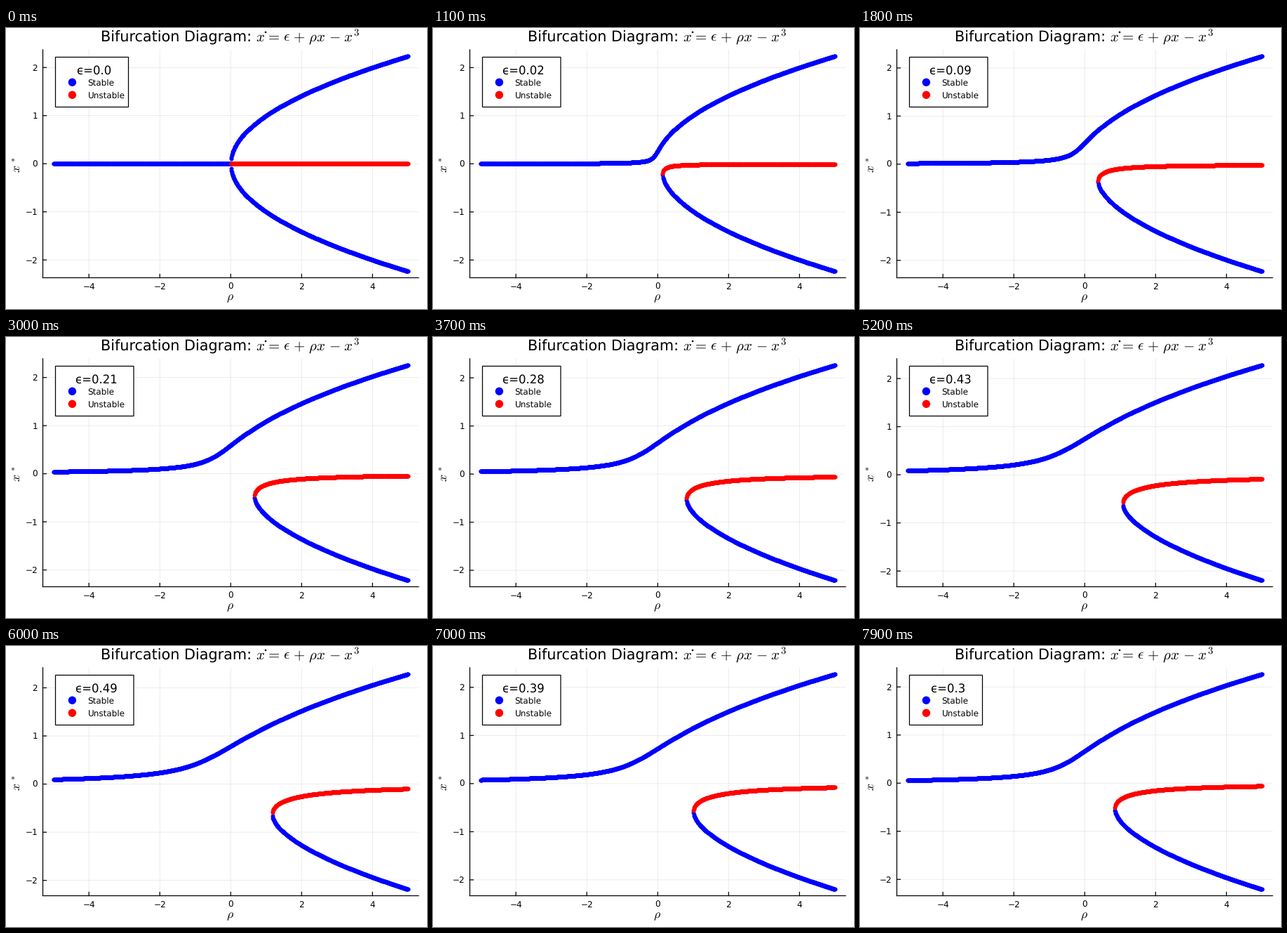
Recreate the animation shown at these times as a matplotlib script. Size 600 by 400 pixels, loop 8000 ms.

```python
import numpy as np
import matplotlib.pyplot as plt
from matplotlib.animation import FuncAnimation
from matplotlib.patches import Circle, Rectangle

W, H, DPI = 600, 400, 100
PT = 72 / DPI
LEFT, RIGHT, TOP, BOTTOM = 52.5, 588, 30.9, 355.5
BLUE, RED = "#0000ff", "#ff0000"

plt.rcParams.update({
    "font.family": "DejaVu Sans",
    "mathtext.fontset": "cm",
    "text.hinting": "none",
    "path.simplify": False,
    "path.snap": False,
})

fig = plt.figure(figsize=(W / DPI, H / DPI), dpi=DPI, facecolor="white")
ax = fig.add_axes([0, 0, 1, 1])
ax.set_xlim(0, W)
ax.set_ylim(H, 0)
ax.axis("off")

rho = np.linspace(-5, 5, 1001)


def px(x):
    return LEFT + (x + 5.3) / 10.6 * (RIGHT - LEFT)


def line(xs, ys, width=1.25, z=3, **kw):
    return ax.plot(xs, ys, color="black", lw=width * PT, zorder=z, **kw)[0]


def grid(xs, ys):
    return line(xs, ys, width=0.7, z=1, alpha=0.1)


def label(x, y, s, size, ha="left", **kw):
    return ax.text(x, y, s, fontsize=size * PT, ha=ha, va="baseline",
                   zorder=8, **kw)


def dots(color, z):
    return ax.plot([], [], "o", color=color, ms=6 * PT, mew=0, zorder=z)[0]


def spaced(formula):
    """Widen the gaps around the operators of a formula."""
    gap = r"\hspace{0.116}"
    for op in "=+-":
        formula = formula.replace(f" {op} ", f"{gap} {op} {gap}")
    return f"${formula}$"


def equilibria(eps):
    """Real roots of eps + rho x - x^3: top branch, then the lower pair."""
    top = np.full_like(rho, 3.0)
    for _ in range(60):
        slope = np.maximum(3 * top**2 - rho, 1e-12)
        top = top - (top**3 - rho * top - eps) / slope
    disc = 4 * rho - 3 * top**2
    ok = (disc >= 0) & (rho > 0)
    root = np.sqrt(disc[ok])
    return top, rho[ok], (root - top[ok]) / 2, (-root - top[ok]) / 2


def epsilon(i):
    """Hold at zero, rise to 0.5, then fall again, in hundredths."""
    return max(0, min(i - 9, 109 - i)) / 100


# Axes
line([LEFT, LEFT], [TOP, BOTTOM])
line([LEFT, RIGHT], [BOTTOM, BOTTOM])
for v in (-4, -2, 0, 2, 4):
    x = px(v)
    grid([x, x], [TOP, BOTTOM])
    line([x, x], [BOTTOM, BOTTOM - 5])
    label(x, 371.5, str(v).replace("-", "\u2212"), 12, "center")

levels = (-2, -1, 0, 1, 2)
y_grid = [grid([], []) for _ in levels]
y_ticks = [line([], []) for _ in levels]
y_names = [label(45, 0, str(v).replace("-", "\u2212"), 12, "right")
           for v in levels]

# Titles
label(135.3, 20, "Bifurcation Diagram:", 20.8)
label(356, 20, spaced(r"x = \epsilon + \rho x - x^3"), 20.8)
ax.add_patch(Circle((370, 6), 1.3, color="black", lw=0, zorder=8))
label(319.7, 387, r"$\rho$", 17.6, "center")
ax.text(24.7, 206, r"$x^{\,*}$", fontsize=17.6 * PT, rotation=90,
        ha="right", va="bottom", zorder=8)

# Curves
upper, lower, middle = dots(BLUE, 4), dots(BLUE, 4), dots(RED, 5)

# Legend
box = Rectangle((70.5, 41.5), 104, 71, fc="white", ec="black",
                lw=1.25 * PT, zorder=6)
ax.add_patch(box)
head = label(0, 66, "", 16.5, "center")
for y, color, name in ((77.3, BLUE, "Stable"), (95.3, RED, "Unstable")):
    ax.add_patch(Circle((94.4, y), 5.7, color=color, lw=0, zorder=7))
    label(116.6, y + 4.5, name, 12)


def draw(i):
    eps = epsilon(i)
    top, r, mid, low = equilibria(eps)
    lo, hi = low.min(), top.max()
    pad = 0.03 * (hi - lo)

    def py(y):
        return BOTTOM - (y - lo + pad) / (hi - lo + 2 * pad) * (BOTTOM - TOP)

    upper.set_data(px(rho), py(top))
    middle.set_data(px(r), py(mid))
    lower.set_data(px(r), py(low))
    for v, g, t, name in zip(levels, y_grid, y_ticks, y_names):
        y = py(v)
        g.set_data([LEFT, RIGHT], [y, y])
        t.set_data([LEFT, LEFT + 5], [y, y])
        name.set_y(y + 4.4)

    text = str(eps)
    wide = len(text) > 3
    head.set_text("\u03f5=" + text)
    head.set_x(128.7 if wide else 125.4)
    box.set_width(111.5 if wide else 104)
    return []


anim = FuncAnimation(fig, draw, frames=80, interval=100, init_func=lambda: draw(0),
                     repeat=True, repeat_delay=0, blit=False)
plt.show()
```
